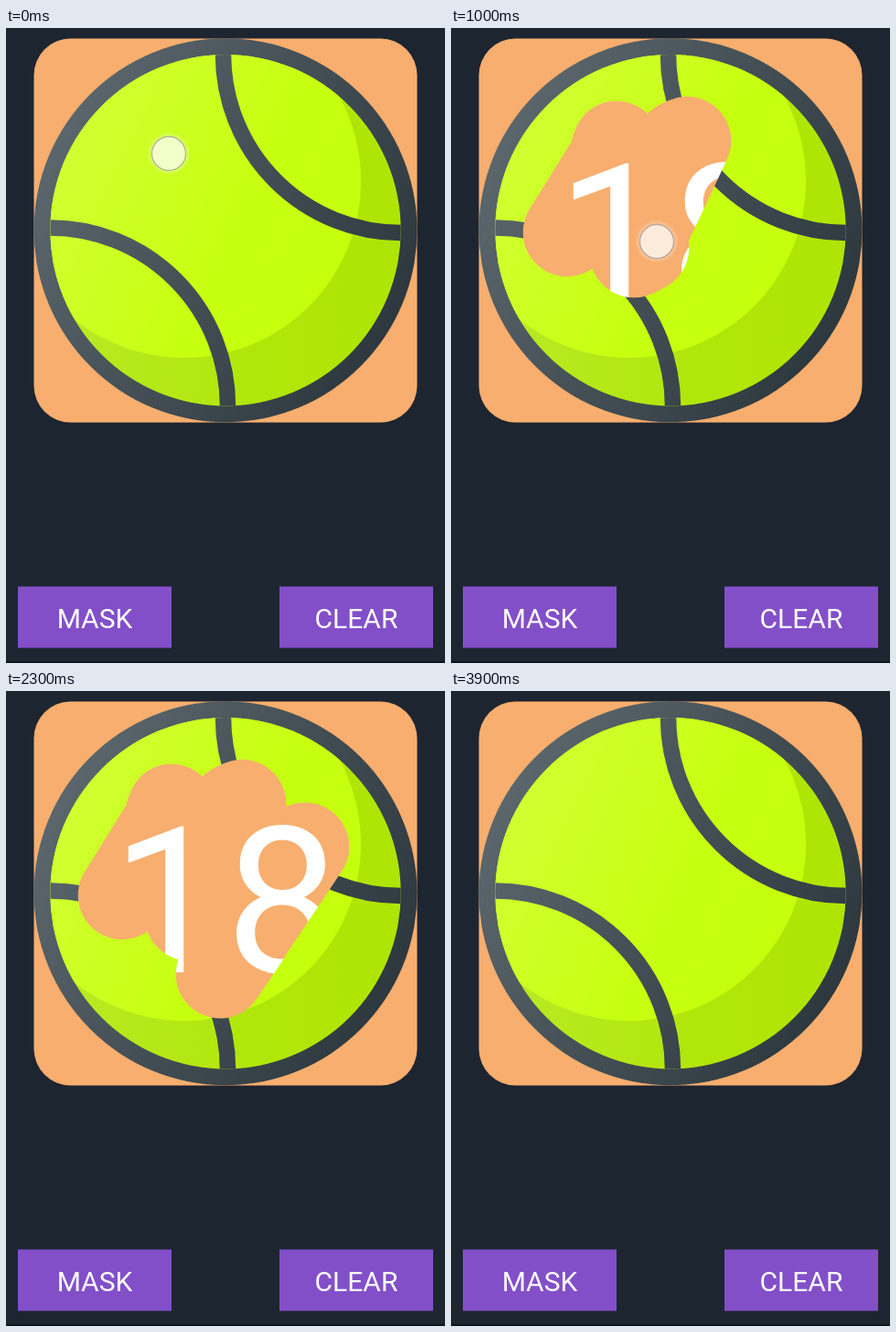
Animation of 480 by 693 pixels, one loop 4 s. Source, as an HTML page:

```html
<!DOCTYPE html>
<html lang="en">
<head>
<meta charset="utf-8">
<title>Scratch card</title>
<style>
  html, body { margin: 0; width: 100%; height: 100%; overflow: hidden; background: #1d2530; }
  svg { display: block; width: 480px; height: 693px; }
  text { font-family: Roboto, sans-serif; fill: #fff; text-anchor: middle; }
  .label { font-size: 30px; }
  .seam { fill: none; stroke: url(#rim); stroke-width: 17.5; }
</style>
</head>
<body>
<svg viewBox="0 0 480 693">
  <defs>
    <linearGradient id="rim" gradientUnits="userSpaceOnUse" x1="50" y1="120" x2="430" y2="320">
      <stop offset="0" stop-color="#5b676c"/>
      <stop offset=".5" stop-color="#434f55"/>
      <stop offset="1" stop-color="#2c383e"/>
    </linearGradient>
    <linearGradient id="felt" gradientUnits="userSpaceOnUse" x1="60" y1="130" x2="400" y2="290">
      <stop offset="0" stop-color="#d0ff32"/>
      <stop offset=".55" stop-color="#c7ff11"/>
      <stop offset="1" stop-color="#c5ff0a"/>
    </linearGradient>
    <linearGradient id="shade" gradientUnits="userSpaceOnUse" x1="80" y1="330" x2="400" y2="330">
      <stop offset="0" stop-color="#b8ea22"/>
      <stop offset=".6" stop-color="#b1e60a"/>
      <stop offset="1" stop-color="#afe504"/>
    </linearGradient>
    <radialGradient id="glow">
      <stop offset=".75" stop-color="#fff" stop-opacity=".35"/>
      <stop offset="1" stop-color="#fff" stop-opacity="0"/>
    </radialGradient>
    <clipPath id="inside"><circle cx="240" cy="220.7" r="191.7"/></clipPath>
    <mask id="scratch" maskUnits="userSpaceOnUse" x="0" y="0" width="480" height="693">
      <rect width="480" height="693" fill="#fff"/>
      <path id="trail" fill="none" stroke="#000" stroke-width="96.5" stroke-linecap="round" stroke-linejoin="round"/>
    </mask>
  </defs>

  <rect width="480" height="693" fill="#1d2530"/>
  <rect y="691.5" width="480" height="1.5" fill="#0b0e13"/>

  <rect x="30.5" y="11.5" width="419" height="419" rx="40" fill="#f7ae6e"/>
  <text x="240" y="307" font-size="222">18</text>

  <g mask="url(#scratch)">
    <circle cx="240" cy="220.7" r="209.5" fill="url(#rim)"/>
    <g clip-path="url(#inside)">
      <rect x="40" y="20" width="400" height="400" fill="url(#shade)"/>
      <circle cx="195" cy="167" r="193" fill="url(#felt)"/>
      <circle class="seam" cx="432" cy="29" r="194.5"/>
      <circle class="seam" cx="48" cy="412.5" r="194.5"/>
    </g>
  </g>

  <g fill="#824fc9">
    <rect x="13" y="609.5" width="168" height="67"/>
    <rect x="299" y="609.5" width="168" height="67"/>
  </g>
  <text class="label" x="97" y="654.5">MASK</text>
  <text class="label" x="383" y="654.5">CLEAR</text>

  <g id="touch">
    <circle r="24" fill="url(#glow)"/>
    <circle r="18.5" fill="#fff" fill-opacity=".62" stroke="#8f8795" stroke-opacity=".6" stroke-width="1.4"/>
  </g>
</svg>
<script>
  const LOOP = 4000, STEP = 100, LAG = 50;
  const RELEASE = 1800, PRESS = 3400, CLEAR = 3700;

  // Finger route: time, x, y
  const route = [
    [0, 178, 137], [50, 175, 146], [150, 147, 191], [250, 127, 223], [300, 142, 211],
    [450, 223, 147], [500, 251, 126], [600, 258, 123], [700, 236, 170],
    [800, 207, 231], [880, 200, 246], [950, 212, 240], [1000, 225, 233],
    [1200, 327, 170], [1450, 266, 261], [1500, 260, 271], [1700, 234, 309]
  ];
  const trail = document.getElementById('trail');
  const touch = document.getElementById('touch');

  function fingerAt(t) {
    const i = route.findIndex(p => p[0] > t);
    if (i < 0) return route[route.length - 1].slice(1);
    const [t0, x0, y0] = route[i - 1], [t1, x1, y1] = route[i];
    const k = (t - t0) / (t1 - t0);
    return [x0 + (x1 - x0) * k, y0 + (y1 - y0) * k];
  }

  function trailAt(t) {
    if (t < 0) return '';
    const points = route.filter(p => p[0] <= t).map(p => p.slice(1));
    return 'M181 128L' + [...points, fingerAt(t)].join('L');
  }

  function draw(now) {
    const t = Math.floor(now % LOOP / STEP) * STEP;
    trail.setAttribute('d', t < CLEAR ? trailAt(t - LAG) : '');
    const tapping = t >= PRESS && t < CLEAR;
    const [x, y] = tapping ? [383, 659] : fingerAt(t);
    touch.setAttribute('transform', `translate(${x} ${y})`);
    touch.setAttribute('visibility', t < RELEASE || tapping ? 'visible' : 'hidden');
  }

  let start;
  function tick(now) {
    start ??= now;
    draw(now - start);
    requestAnimationFrame(tick);
  }
  draw(0);
  requestAnimationFrame(tick);
</script>
</body>
</html>
```
